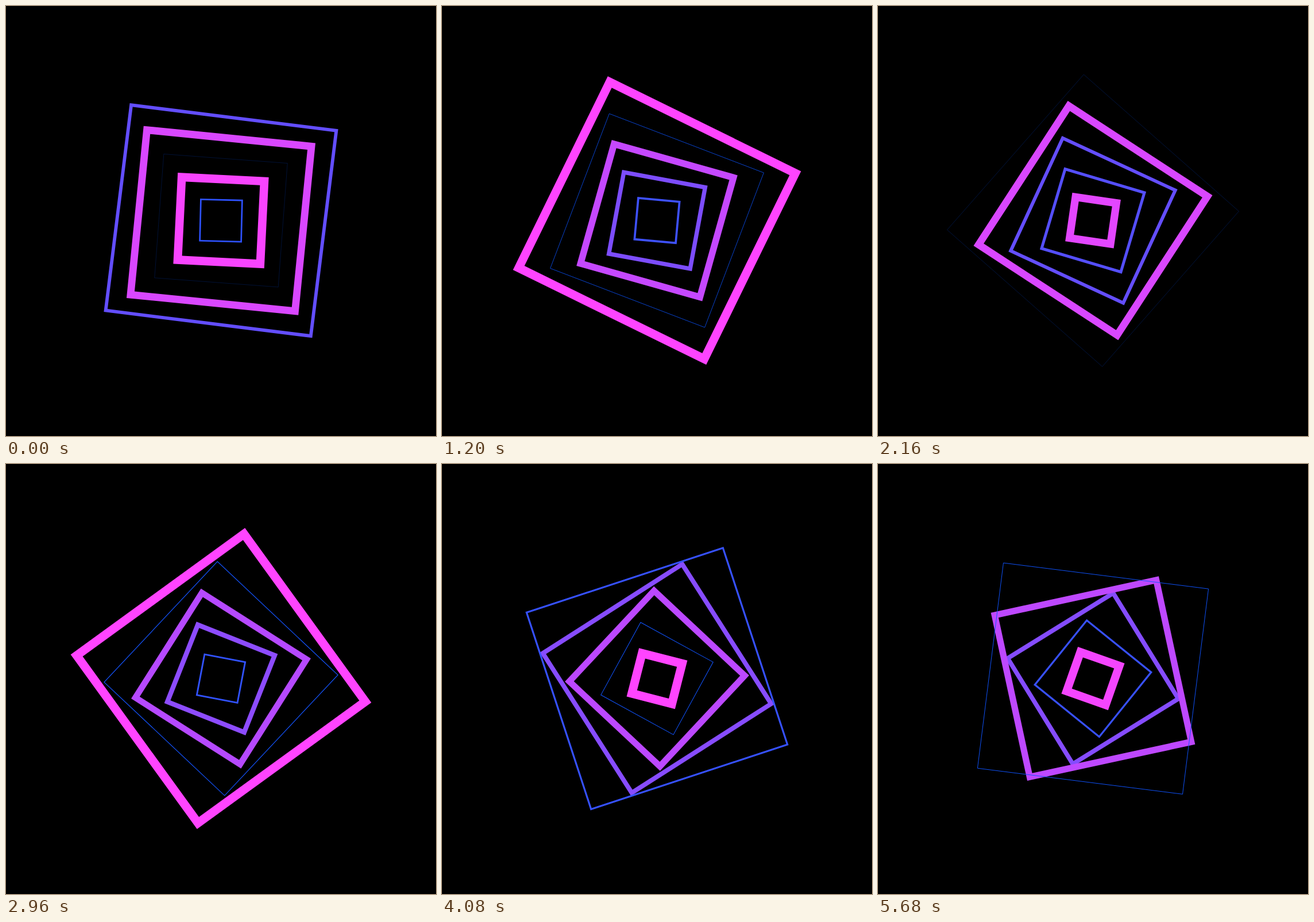
These frames come from a looping animation (749x748 px, 5.76 s). An HTML page without scripts:

```html
<!DOCTYPE html>
<html lang="en">
<head>
<meta charset="utf-8">
<title>Pulsing squares</title>
<style>
  @property --t {
    syntax: "<number>";
    inherits: true;
    initial-value: 0;
  }

  html, body {
    margin: 0;
    width: 100%;
    height: 100%;
    overflow: hidden;
    background: #000;
  }

  svg {
    display: block;
    width: 100%;
    height: 100%;
    animation: tick 5760ms steps(72) infinite;
  }

  @keyframes tick {
    from { --t: 0; }
    to { --t: 72; }
  }

  /* --k is the ring number, counted from the centre */
  rect {
    --side: calc(var(--k) * 72px);
    --phase: calc((var(--t) * 16.7 + var(--k) * 148.2 - 278) * 1deg);
    --pulse: calc(0.5 + 0.5 * cos(var(--phase)));
    x: calc(var(--side) / -2);
    y: calc(var(--side) / -2);
    width: var(--side);
    height: var(--side);
    fill: none;
    stroke: rgb(calc(255 * var(--pulse)) calc(85 - 17 * var(--pulse)) 255);
    stroke-width: calc(15px * var(--pulse));
    transform: rotate(calc((7.1 + var(--t) * 1.269) * var(--k) / 5 * 1deg));
  }
</style>
</head>
<body>
<svg viewBox="-374.5 -373.2 749 748">
  <rect style="--k: 1"/>
  <rect style="--k: 2"/>
  <rect style="--k: 3"/>
  <rect style="--k: 4"/>
  <rect style="--k: 5"/>
</svg>
</body>
</html>
```
